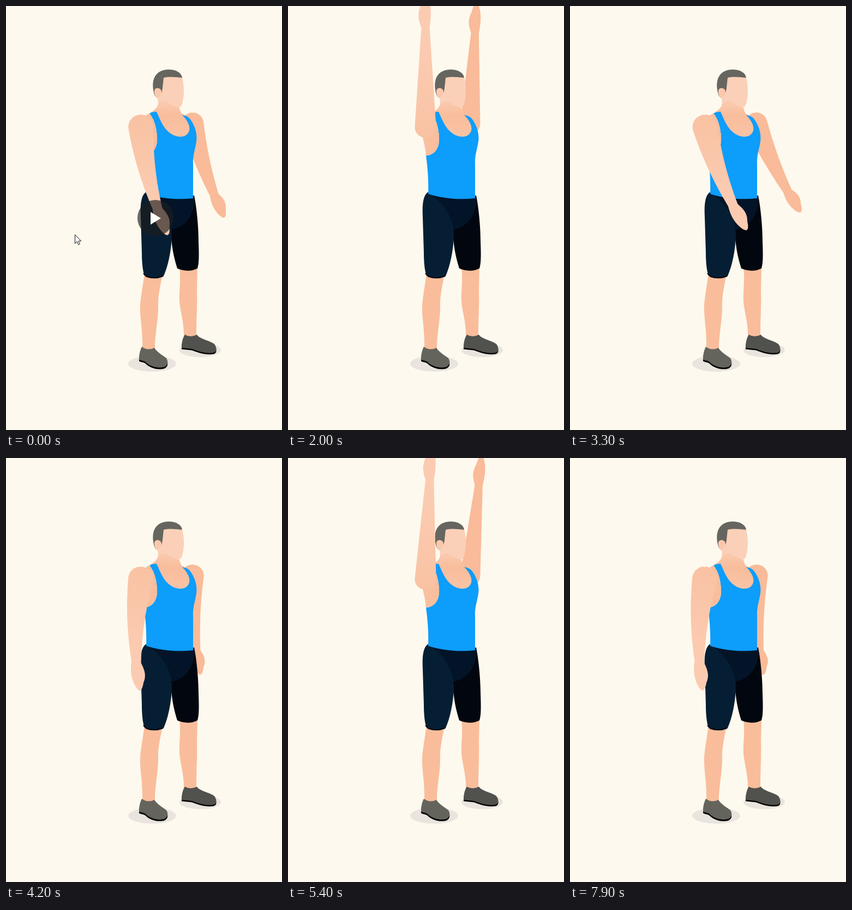
An HTML page that plays this animation: 506 by 774 pixels, repeating every 8 s.

```html
<!DOCTYPE html>
<html lang="en">
<head>
<meta charset="utf-8">
<title>Arm raise exercise</title>
<style>
  html, body { margin: 0; width: 100%; height: 100%; overflow: hidden; background: #fef9ee; }
  svg { display: block; width: 506px; height: 774px; }
</style>
</head>
<body>
<svg viewBox="0 0 506 774">
  <defs>
    <linearGradient id="nearSkin" gradientUnits="userSpaceOnUse" x1="0" y1="-15" x2="0" y2="130">
      <stop offset="0" stop-color="#f9c2a3"/>
      <stop offset="1" stop-color="#fbcbb1"/>
    </linearGradient>
    <linearGradient id="pitSkin" gradientUnits="userSpaceOnUse" x1="242" y1="0" x2="277" y2="0">
      <stop offset="0" stop-color="#f9c2a3"/>
      <stop offset="1" stop-color="#f8bd9b"/>
    </linearGradient>
    <linearGradient id="neckSkin" gradientUnits="userSpaceOnUse" x1="0" y1="165" x2="0" y2="235">
      <stop offset="0" stop-color="#fbcfb6"/>
      <stop offset=".5" stop-color="#f8bd9b"/>
      <stop offset="1" stop-color="#f9c3a5"/>
    </linearGradient>
    <path id="nearShoe" d="M244 645C244 635 246 628 249 622Q260 630 272 624C277 632 288 638 294 643C298 649 297 656 290 659C276 662 263 657 256 650C251 646 247 648 244 645Z"/>
    <path id="farShoe" d="M322 624C322 612 325 604 328 600Q338 606 350 600C355 608 372 610 382 617C387 624 387 632 380 633C365 635 351 630 341 626Z"/>
  </defs>

  <g fill="#e9e4dd">
    <ellipse cx="268" cy="653" rx="44" ry="14.5"/>
    <ellipse cx="356" cy="628" rx="38" ry="13"/>
  </g>
  <path id="farArm" fill="#f9bb99"/>

  <g fill="#f9bd9b">
    <path d="M318 478C321 500 317 520 318 540C320 560 327 580 326 605L349 605C349 570 351 540 350 520L351 476Z"/>
    <path d="M254 488C251 510 248 525 246 545C245 570 251 590 250 628L273 628C272 605 279 575 279 550C278 530 283 510 287 490Z"/>
  </g>
  <use href="#farShoe" y="2.5"/><use href="#farShoe" fill="#51514d"/>
  <use href="#nearShoe" y="3"/><use href="#nearShoe" fill="#64645d"/>

  <path fill="#02060f" d="M290 348L345 346C349 365 353 400 353 430C354 455 354 470 351 479C340 485 325 484 314 479C308 460 305 445 303 425Z"/>
  <path fill="#031428" d="M256 340C285 350 315 354 345 347C348 380 328 405 303 408Z"/>
  <path fill="#061e33" d="M256 340C247 347 246 365 247 385L249 450C249 470 251 485 254 492C264 498 277 499 289 493C297 475 303 448 304 420C305 385 284 358 256 340Z"/>
  <path fill="none" stroke="#02070f" stroke-width="2" d="M252 488Q255 492 258 494Q273 499 288 493"/>

  <path fill="url(#neckSkin)" d="M278 158L279 178C278 187 270 190 264 196L290 240L333 240L342 208C336 203 326 200 321 195L317 184L300 158Z"/>
  <path fill="#0d9dfa" d="M263 196Q268 193 276 193C281 203 286 219 297 229C310 241 327 241 333 233C340 225 336 212 323 199Q333 200 338 207C346 218 351 232 349 247C347 262 342 272 343 290L343 351C315 354 285 352 257 343C258 318 256 295 253 273C270 272 278 258 277 240C276 220 271 206 263 196Z"/>
  <path fill="url(#pitSkin)" d="M263 196C271 206 276 220 277 240C278 258 270 272 253 273C252 262 250 252 247 240C240 225 245 203 263 196Z"/>

  <path fill="#66655f" d="M271 158C265 132 276 116 298 116C312 116 322 122 323 131L291 136L285 160L278 168C274 166 272 163 271 158Z"/>
  <path fill="#fbd0b8" d="M289 131C300 128 312 130 323 131C326 140 327 158 325 168C324 178 321 186 316 185C308 184 299 178 293 173L279 177L278 164L286 159Z"/>
  <path fill="#fac8ad" d="M284 153C279 147 271 150 272 157C272 163 275 168 279 168L286 159Z"/>
  <path id="nearArm" fill="url(#nearSkin)"/>

  <g id="play">
    <circle cx="274" cy="387" r="33" fill="#1e1e1e" fill-opacity=".66"/>
    <path fill="#fff" d="M265 376L284 387.500L265 399Z"/>
  </g>
  <path id="cursor" fill="#fff" stroke="#111" d="M126.500 417.500V433.500L130.200 430L132.700 435.700L135.300 434.600L132.800 429H137.800Z"/>
</svg>

<script>
const LOOP = 8000, STEP = 100;
const SHOULDER = 23, WRIST = 155, HAND = 52;
const { PI, sin, cos, sqrt, abs, max, min, floor } = Math;
const $ = id => document.getElementById(id);

// Each swing: start, end, and arm angle before and after (0 hangs, 180 is overhead).
const SWINGS = [
  [-430, 1870, 0, 180], [2150, 3650, 180, 0],
  [4150, 5500, 0, 180], [6215, 7715, 180, 0]
];

function angleAt(t) {
  const [start, end, from, to] = SWINGS.filter(s => s[0] <= t).pop();
  const p = min(1, (t - start) / (end - start));
  return from + (to - from) * (1 - cos(PI * p)) / 2;
}

// Half width of the arm: round shoulder, tapering limb, then the hand.
function halfWidth(y) {
  if (y < 0) return sqrt(SHOULDER ** 2 - y ** 2);
  if (y < WRIST) return SHOULDER - 14 * y / WRIST;
  const u = (y - WRIST) / HAND;
  return 9 * sqrt(1 - u ** 3) + 3 * sin(PI * u);
}

const thumb = y => 3 * sin(PI * min(1, max(0, (y - WRIST) / 36)));

function drawArm(id, { x, y, angle, width, length, bend }) {
  const left = [], right = [];
  for (let s = -SHOULDER; s <= WRIST + HAND; s += 2) {
    const mid = bend * (max(0, s) / 200) ** 2;
    const w = halfWidth(s) * width;
    const down = (s * (s < 0 ? width : length)).toFixed(1);
    left.push((mid - w).toFixed(1) + " " + down);
    right.unshift((mid + w + thumb(s)).toFixed(1) + " " + down);
  }
  $(id).setAttribute("d", "M" + left.concat(right).join("L") + "Z");
  $(id).setAttribute("transform", `translate(${x} ${y}) rotate(${-angle})`);
}

function draw(t) {
  const a = angleAt(t), c = cos(a * PI / 180);
  const hang = max(0, c), over = max(0, -c) ** 3;
  drawArm("nearArm", {
    x: 255 - 8 * hang - 3 * over, y: 221, angle: a - 11 * hang,
    width: 1 - .15 * over, length: .97 + .2 * over, bend: 32 * hang
  });
  drawArm("farArm", {
    x: 334 + 8 * hang, y: 215, angle: a - 3 * abs(c),
    width: .9 - .1 * over, length: .87 + .2 * over, bend: 20 * hang
  });
  $("play").setAttribute("opacity", max(0, 1 - t / 400));
  $("cursor").setAttribute("opacity", t < 300 ? 1 : 0);
}

const begin = performance.now();
function tick() {
  const t = (performance.now() - begin) % LOOP;
  draw(floor(t / STEP) * STEP);
  requestAnimationFrame(tick);
}
tick();
</script>
</body>
</html>
```
